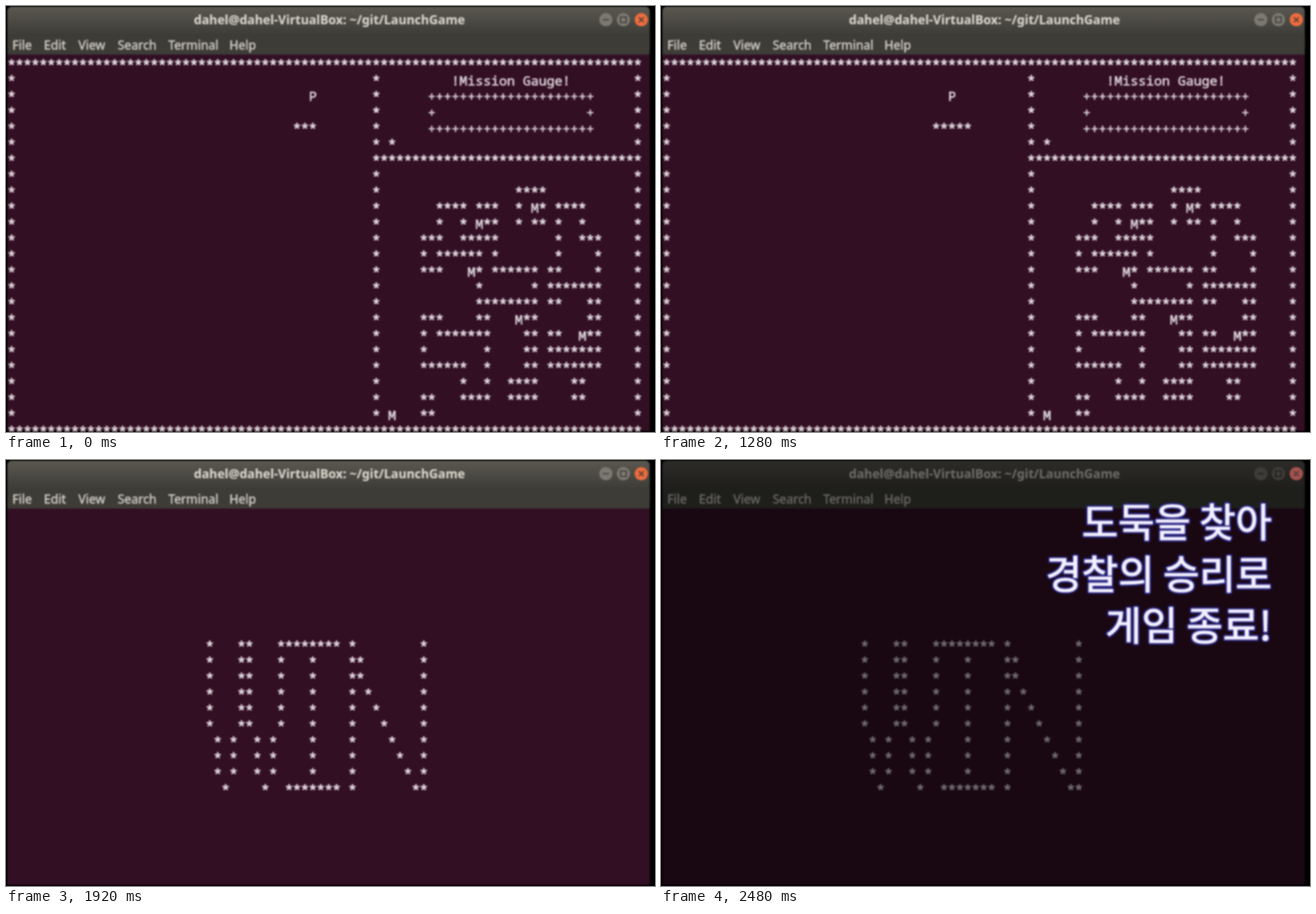
An HTML page with a canvas that plays this animation: 924x606 px, repeating every 2560 ms.

```html
<!DOCTYPE html>
<html lang="ko">
<head>
<meta charset="utf-8">
<title>Terminal game</title>
<style>
html, body { margin: 0; width: 100%; height: 100%; overflow: hidden; background: #000; }
canvas { display: block; }
</style>
</head>
<body>
<canvas id="stage" width="924" height="606"></canvas>
<script>
const W = 924, H = 606, LOOP = 2560;
const CELL = 11.285, LINE = 22.68, X0 = 8, Y0 = 80;
const SANS = '"Noto Sans", "Open Sans", sans-serif';
const MONO = '"Noto Sans Mono", "DejaVu Sans Mono", monospace';
const INK = '#e0d8dd';

const out = document.getElementById('stage').getContext('2d');
const layer = document.createElement('canvas');
layer.width = W;
layer.height = H;
const g = layer.getContext('2d');

// Strings start at column 52 of rows 8 to 22.
const MAP = [
  '            ****',
  '  **** ***  * M* ****',
  '  *  * M**  * ** *  *',
  '***  *****       *  ***',
  '* ****** *       *    *',
  '***   M* ****** **    *',
  '       *      * *******',
  '       ******** **   **',
  '***    **   M**      **',
  '* *******    ** **  M**',
  '*       *    ** *******',
  '******  *    ** *******',
  '     *  *  ****    **',
  '**   ****  ****    **',
  '**'
];

// Strings start at column 25 of rows 8 to 17.
const WIN = [
  '*   **   ******** *        *',
  '*   **   *   *    **       *',
  '*   **   *   *    **       *',
  '*   **   *   *    * *      *',
  '*   **   *   *    *  *     *',
  '*   **   *   *    *   *    *',
  ' * *  * *    *    *    *   *',
  ' * *  * *    *    *     *  *',
  ' * *  * *    *    *      * *',
  '  *    *  ******* *       **'
];

// Start time, player column, first and last floor column, thief column.
const MOVES = [
  [0, 38, 36, 38],
  [400, 37, 35, 38],
  [880, 36, 34, 38],
  [1360, 35, 33, 37, 33]
];
const WIN_AT = 1680, CAPTION_AT = 2080;

// Fill plus a thin outline gives a medium weight.
function glyphs(str, x, y, weight) {
  g.fillText(str, x, y);
  g.lineWidth = weight;
  g.strokeText(str, x, y);
}

function star(x, y) {
  g.lineWidth = 2.3;
  g.beginPath();
  for (let i = 0; i < 5; i++) {
    const a = -Math.PI / 2 + i * Math.PI * 0.4;
    g.moveTo(x, y);
    g.lineTo(x + 4.6 * Math.cos(a), y + 4.6 * Math.sin(a));
  }
  g.stroke();
}

function put(col, row, str) {
  [...str].forEach((ch, i) => {
    const x = X0 + (col + i) * CELL, y = Y0 + row * LINE;
    if (ch === '*') star(x, y);
    else if (ch !== ' ') glyphs(ch, x, y + 10, 0.6);
  });
}

function text(str, x, y, font, color, align, weight) {
  g.font = font;
  g.fillStyle = g.strokeStyle = color;
  g.textAlign = align;
  glyphs(str, x, y, weight);
}

function button(x, color, glyph) {
  g.fillStyle = color;
  g.beginPath();
  g.arc(x, 19.5, 9.5, 0, Math.PI * 2);
  g.fill();
  g.strokeStyle = '#3c3a35';
  g.lineWidth = 1.6;
  g.stroke(new Path2D(glyph));
}

function closeButton(color) {
  button(904.5, color, 'M901 16l7 7M908 16l-7 7');
}

function drawWindow() {
  g.fillStyle = '#000';
  g.fillRect(0, 0, W, H);
  const bar = g.createLinearGradient(0, 1, 0, 40);
  bar.addColorStop(0, '#5a5850');
  bar.addColorStop(1, '#3e3d38');
  g.fillStyle = bar;
  g.beginPath();
  g.roundRect(2, 1, 914.5, 60, [6, 6, 0, 0]);
  g.fill();
  g.fillStyle = '#3d3c37';
  g.fillRect(2, 40, 914.5, 29);
  g.fillStyle = '#330f24';
  g.fillRect(2, 69, 914.5, 535.5);

  text('dahel@dahel-VirtualBox: ~/git/LaunchGame', 460.5, 26, 'bold 17.6px ' + SANS, '#d8d4cb', 'center', 0.2);
  const menu = [['File', 9], ['Edit', 54], ['View', 103], ['Search', 159], ['Terminal', 231], ['Help', 318]];
  for (const [name, x] of menu) text(name, x, 61.5, '17.5px ' + SANS, '#cfccc4', 'left', 0.5);

  button(854, '#7b7970', 'M849.5 19.5h9');
  button(879, '#7b7970', 'M875 15.5h8v8h-8z');
  closeButton('#ee6c3e');
}

function drawBoard([, player, from, to, thief]) {
  const edge = '*'.repeat(80);
  put(0, 0, edge);
  put(0, 23, edge);
  for (let row = 1; row < 23; row++) {
    put(0, row, '*');
    put(46, row, row === 6 ? '*'.repeat(34) : '*');
    if (row !== 6) put(79, row, '*');
  }
  put(56, 1, '!Mission Gauge!');
  put(53, 2, '+'.repeat(21));
  put(53, 3, '+' + ' '.repeat(19) + '+');
  put(53, 4, '+'.repeat(21));
  put(48, 5, '*');
  put(48, 22, 'M');
  MAP.forEach((line, i) => put(52, 8 + i, line));

  put(player, 2, 'P');
  put(from, 4, '*'.repeat(to - from + 1));
  if (thief) put(thief, 1, 'T');
}

function drawCaption() {
  g.fillStyle = 'rgba(0, 0, 0, 0.5)';
  g.fillRect(0, 0, W, H);
  closeButton('#a5524f');

  g.lineJoin = 'round';
  g.font = '500 56px "Noto Sans CJK KR", "Noto Sans CJK", sans-serif';
  g.textAlign = 'right';
  ['도둑을 찾아', '경찰의 승리로', '게임 종료!'].forEach((line, i) => {
    const y = 109 + i * 73.5;
    g.strokeStyle = '#2c2a86';
    g.shadowColor = '#2b2a90';
    g.shadowBlur = 2;
    g.lineWidth = 4.5;
    g.strokeText(line, 869.5, y);
    g.shadowBlur = 0;
    g.fillStyle = g.strokeStyle = '#f3f0ff';
    glyphs(line, 869.5, y, 1.2);
  });
}

function draw(move, won, caption) {
  drawWindow();
  g.font = '18.8px ' + MONO;
  g.textAlign = 'center';
  g.fillStyle = g.strokeStyle = INK;
  if (won) WIN.forEach((line, i) => put(25, 8 + i, line));
  else drawBoard(move);
  if (caption) drawCaption();

  out.fillStyle = '#000';
  out.fillRect(0, 0, W, H);
  out.filter = 'blur(0.8px)';
  out.drawImage(layer, 0, 0);
  out.filter = 'none';
}

let shown = '';
function tick() {
  const t = performance.now() % LOOP;
  const move = MOVES.filter(m => m[0] <= t).pop();
  const won = t >= WIN_AT, caption = t >= CAPTION_AT;
  const key = [move[0], won, caption].join();
  if (key !== shown) {
    draw(move, won, caption);
    shown = key;
  }
  requestAnimationFrame(tick);
}
tick();
</script>
</body>
</html>
```
